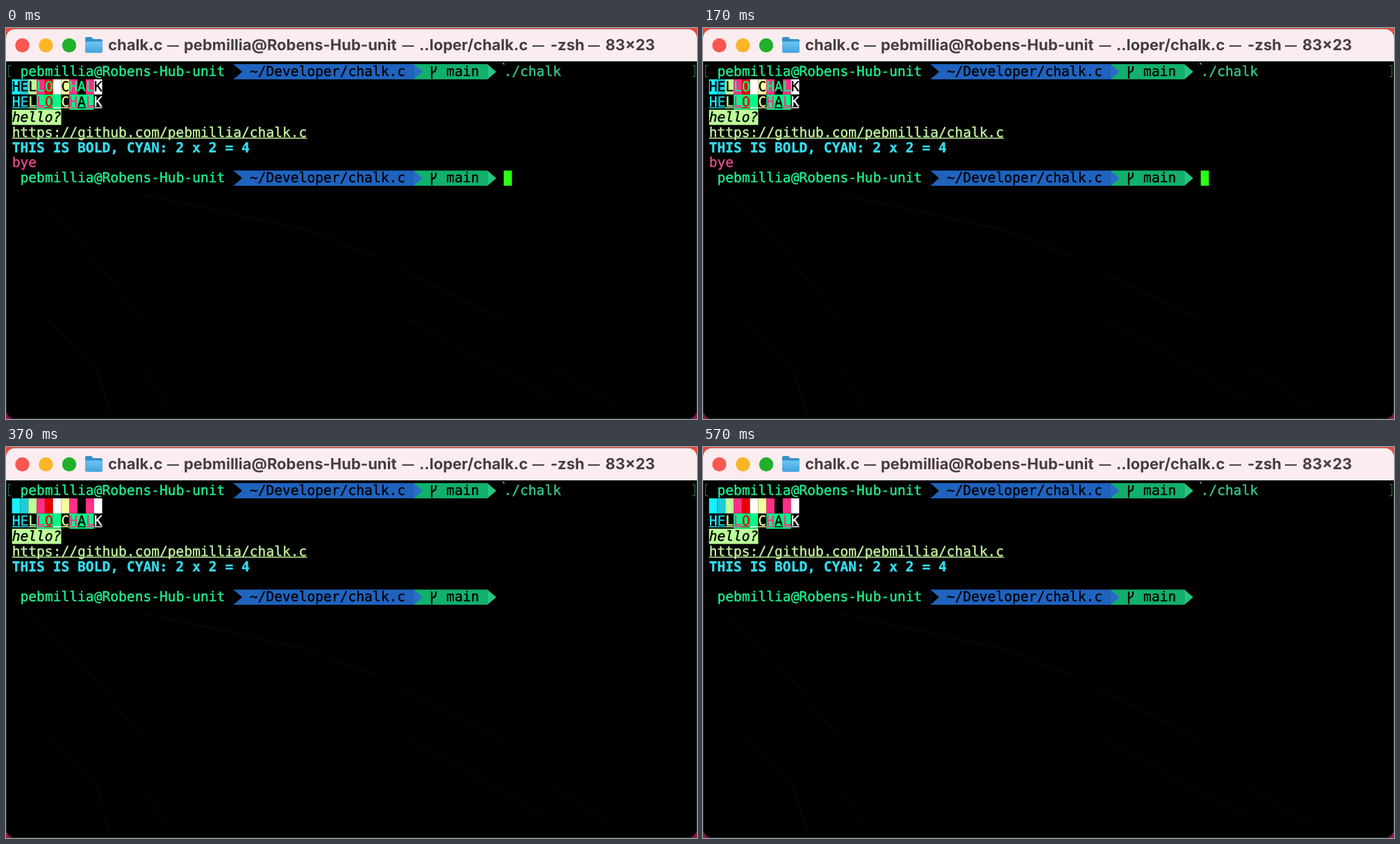
Animation, 995 px wide and 563 px high, one loop 0.6 s. Source, as an HTML page:

```html
<!DOCTYPE html>
<html lang="en">
<head>
<meta charset="utf-8">
<title>chalk.c</title>
<style>
  html, body { margin: 0; width: 100%; height: 100%; overflow: hidden; background: #000; }
  svg { display: block; width: 995px; height: 563px; }
  text { white-space: pre; text-rendering: geometricPrecision; }
  .term { font: 19.6px "DejaVu Sans Mono", monospace; }
  .title { font: 700 22px Inter, sans-serif; fill: #453d41; }
  .dash { font-size: 17px; text-anchor: middle; }
</style>
</head>
<body>
<svg id="stage" viewBox="0 0 995 563">
  <defs>
    <linearGradient id="desk" x2="0" y2="1">
      <stop offset="0" stop-color="#ee4a40"/>
      <stop offset="1" stop-color="#8c1a4e"/>
    </linearGradient>
    <linearGradient id="folder" x2="0" y2="1">
      <stop offset="0" stop-color="#6cc5f2"/>
      <stop offset="1" stop-color="#43a5de"/>
    </linearGradient>
    <clipPath id="window"><rect y="1.500" width="995" height="561.500" rx="13"/></clipPath>
  </defs>
  <rect width="995" height="563" fill="url(#desk)"/>
  <g clip-path="url(#window)">
    <rect width="995" height="563"/>
    <path d="M30 235L110 312L195 418M200 240L430 290L535 330M570 348L715 420M60 420L130 488L150 556M198 490L235 548M580 420L785 535M785 488L880 548" fill="none" stroke="#04120a"/>
    <rect x=".5" y="2" width="994" height="560.500" rx="12.500" fill="none" stroke="#1b3025"/>
    <rect width="995" height="48" fill="#fbecef"/>
  </g>
  <circle cx="23.5" cy="25" r="10.2" fill="#fc5650"/>
  <circle cx="57.4" cy="25" r="10.2" fill="#fdb527"/>
  <circle cx="91" cy="25" r="10.2" fill="#20b02c"/>
  <path d="M114 33V15q0-2 2-2h7l3 3h10.500q2.500 0 2.500 2.500V33q0 2.500-2.500 2.500h-20q-2.500 0-2.500-2.500z" fill="#3590c9"/>
  <path d="M114 19.500h25V33q0 2.500-2.500 2.500h-20q-2.500 0-2.500-2.500z" fill="url(#folder)"/>
  <g id="title" class="title"></g>
  <g id="term" class="term"></g>
  <g id="blink" class="term"></g>
</svg>
<script>
const NS = 'http://www.w3.org/2000/svg';
const term = document.getElementById('term');
const blink = document.getElementById('blink');
const LEFT = 8.7, TOP = 52, CELL = 11.8, ROW = 21.9, BASE = 17;
const LOOP = 600, HIDE_AT = 220;

const GREEN = '#1ff08e', LIME = '#bdff99', PINK = '#ff2f87', RED = '#e60000',
      WHITE = '#fff', YELLOW = '#f5ff9b', CYAN = '#16f1ff', TEAL = '#1fccdc',
      BLUE = '#1f63bf', LEAF = '#11b06c', BLACK = '#000', FIELD = '#00fa87';

const px = col => LEFT + col * CELL;
const py = row => TOP + row * ROW;

function add(parent, tag, attrs, text = '') {
  const el = document.createElementNS(NS, tag);
  for (const key in attrs) el.setAttribute(key, attrs[key]);
  el.textContent = text;
  parent.append(el);
  return el;
}

// A hairline stroke gives the slightly heavy terminal lettering
const write = (row, col, text, fill, more = {}, parent = term) =>
  add(parent, 'text', {
    x: px(col), y: py(row) + BASE, fill, stroke: fill, 'stroke-width': 0.4, ...more
  }, text);

const block = (row, col, count, fill, parent = term) =>
  add(parent, 'rect', { x: px(col), y: py(row), width: count * CELL, height: ROW, fill });

const line = (row, col, count, fill) =>
  add(term, 'rect', { x: px(col), y: py(row) + 18.3, width: count * CELL, height: 1.4, fill });

const arrow = (row, col, fill) => {
  const x = px(col), y = py(row);
  add(term, 'path', { d: `M${x} ${y}l${CELL + 1} ${ROW / 2}l${-CELL - 1} ${ROW / 2}z`, fill });
};

function prompt(row) {
  write(row, 1, 'pebmillia@Robens-Hub-unit', GREEN);
  block(row, 27, 22, BLUE);
  arrow(row, 27, BLACK);
  write(row, 29, '~/Developer/chalk.c', BLACK);
  block(row, 49, 9, LEAF);
  arrow(row, 49, '#2a6bc6');
  const x = px(51) + 2.5, y = py(row);
  add(term, 'path', {
    d: `M${x} ${y + 3}V${y + 21}M${x} ${y + 15}q0-3 3-4q3-1 3-5v-3`,
    fill: 'none', stroke: BLACK, 'stroke-width': 2.2
  });
  write(row, 53, 'main', BLACK);
  arrow(row, 58, '#25c681');
}

// Title pieces with the dashes centred between them
const title = document.getElementById('title');
[[147, 'chalk.c'], [256, 'pebmillia@Robens-Hub-unit'], [595, '..loper/chalk.c'],
 [784, '-zsh'], [863, '83×23']].forEach(([x, s]) => add(title, 'text', { x, y: 32 }, s));
[240.5, 579, 766.5, 846.5].forEach(x =>
  add(title, 'text', { x, y: 31, class: 'dash' }, '—'));

prompt(0);
write(0, 60, './chalk', '#35c98c');
add(term, 'path', { d: 'M715.500 50l2 2.500', stroke: '#b9b45a', 'stroke-width': 1.3 });
add(term, 'path', { d: 'M7 54H3.500V70H7M988.500 54H992V70H988.500', fill: 'none', stroke: '#2a664a', 'stroke-width': 1.3 });

// Each letter: foreground, background; the first row shows them swapped
const shades = [[CYAN, BLACK], [TEAL, BLACK], [LIME, BLACK], [PINK, FIELD], [RED, FIELD],
  [WHITE, FIELD], [YELLOW, BLACK], [PINK, FIELD], [BLACK, FIELD], [PINK, FIELD], [WHITE, BLACK]];
shades.forEach(([front, back], i) => {
  const letter = 'HELLO CHALK'[i];
  block(1, i, 1, front);
  write(1, i, letter, back, {}, blink);
  block(2, i, 1, back);
  write(2, i, letter, front);
  line(2, i, 1, front);
});

block(3, 0, 6, LIME);
write(3, 0, 'hello?', BLACK, { 'font-style': 'italic' });
const link = 'https://github.com/pebmillia/chalk.c';
write(4, 0, link, '#c3f5a0');
line(4, 0, link.length, '#c3f5a0');
write(5, 0, 'THIS IS BOLD, CYAN: 2 x 2 = 4', '#35dcec', { 'font-weight': 700 });
write(6, 0, 'bye', '#e34a8d', {}, blink);
prompt(7);
block(7, 60, 1, '#2bff18', blink);

const cut = HIDE_AT / LOOP;
blink.animate([
  { opacity: 1, offset: 0 }, { opacity: 1, offset: cut },
  { opacity: 0, offset: cut }, { opacity: 0, offset: 1 }
], { duration: LOOP, iterations: Infinity });
</script>
</body>
</html>
```
